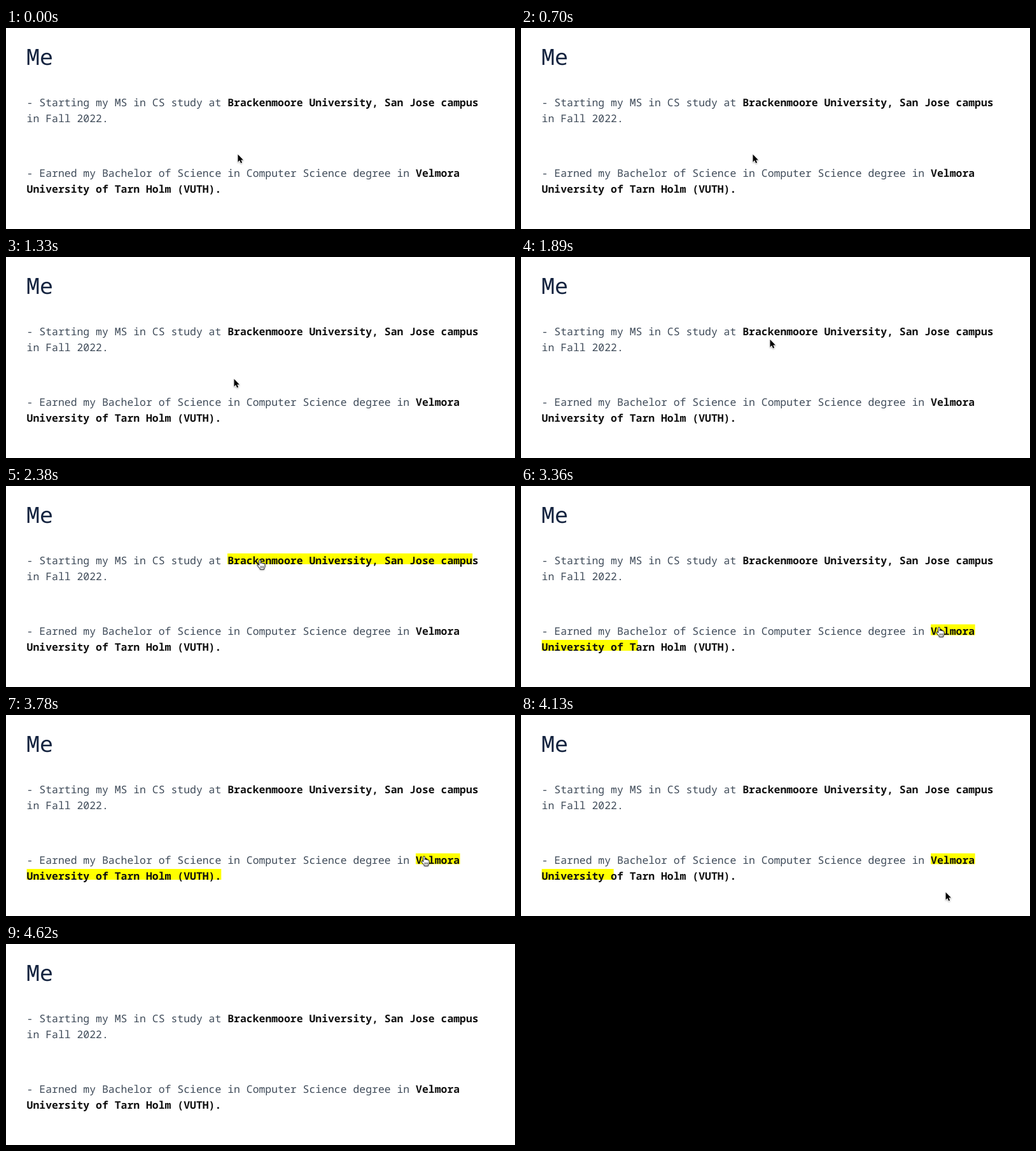
Recreate the animation shown at these times as an HTML page. Size 800 by 316 pixels, loop 4760 ms.

```html
<!DOCTYPE html>
<html lang="en">
<head>
<meta charset="utf-8">
<title>About me</title>
<style>
  html, body { margin: 0; width: 100%; height: 100%; overflow: hidden; background: #fff; }
  svg { display: block; width: 800px; height: 316px; }
  text {
    font: 300 16.45px "Noto Sans Mono", "DejaVu Sans Mono", monospace;
    fill: #3f4b59;
    white-space: pre;
    text-rendering: geometricPrecision;
  }
  .title { font-size: 35px; font-weight: 450; fill: #14233f; }
  .strong { font-weight: 600; fill: #111; }
  .mark rect { fill: #ff0; height: 17px; }
  #arrow, #hand { filter: drop-shadow(0 1px 1px rgba(0, 0, 0, .3)); }
</style>
</head>
<body>
<svg viewBox="0 0 800 316">
  <g class="mark">
    <rect id="school" x="348" y="106"/>
    <rect id="degreeTop" x="644" y="217.5"/>
    <rect id="degreeEnd" x="32.6" y="242"/>
  </g>

  <text class="title" x="32" y="57.5">Me</text>
  <text x="32.6" y="123">- Starting my MS in CS study at <tspan class="strong">Brackenmoore University, San Jose campus</tspan></text>
  <text x="32.6" y="147.6">in Fall 2022.</text>
  <text x="32.6" y="234.3">- Earned my Bachelor of Science in Computer Science degree in <tspan class="strong">Velmora</tspan></text>
  <text class="strong" x="32.6" y="258.9">University of Tarn Holm (VUTH).</text>

  <g id="arrow">
    <path transform="translate(.5 .7) scale(.88)" d="M0 0V13.6L3.1 10.7L5.2 15.6L7.5 14.6L5.4 9.9H9.6Z"
      fill="#000" stroke="#fff" stroke-width="1.6" stroke-linejoin="round" paint-order="stroke"/>
  </g>
  <g id="hand">
    <g transform="translate(-5.5 -.9)" stroke="#111" stroke-linecap="round" stroke-linejoin="round">
      <path fill="#fff" d="M4.2 9.5V2.2a1.3 1.3 0 0 1 2.6 0V6.6a1.2 1.2 0 0 1 2.4 .2a1.2 1.2 0 0 1 2.3 .5
        a1.1 1.1 0 0 1 2 .8V11c0 2-1.2 2.6-1.4 5H6c-.3-2-2.6-3.6-4.4-6.2c-.8-1.4 .8-2.2 1.8-1.2Z"/>
      <path fill="none" stroke-width=".8" d="M6.8 11v2.6M8.9 11v2.6M11 11v2.6"/>
    </g>
  </g>
</svg>
<script>
const LOOP = 4760, STEP = 70, LAST = 4620, FADE = 500, GONE = 4200;
const $ = id => document.getElementById(id);

// time, x, y of the pointer tip
const path = [
  [0, 364, 198], [910, 364, 198], [1330, 358, 191], [1540, 360, 187],
  [1890, 391, 129], [1980, 399, 116], [2660, 399, 116], [2760, 432, 128],
  [3010, 607, 190], [3190, 652, 219], [3290, 657, 222], [3900, 657, 222],
  [3980, 660, 240], [4150, 668, 283], [LOOP, 668, 283]
];
const hovers = [[1980, 2760], [3190, 3980]];
const widths = { school: 394.8, top: 69.6, end: 305.7 };

const clamp = (v, lo, hi) => Math.min(hi, Math.max(lo, v));

// cubic-bezier(.25, .1, .25, 1)
function ease(x) {
  if (x <= 0 || x >= 1) return clamp(x, 0, 1);
  const curve = (s, a, b) => 3 * (1 - s) ** 2 * s * a + 3 * (1 - s) * s * s * b + s ** 3;
  let lo = 0, hi = 1;
  for (let i = 0; i < 24; i++) {
    const mid = (lo + hi) / 2;
    if (curve(mid, .25, .25) < x) lo = mid; else hi = mid;
  }
  return curve(lo, .1, 1);
}

const fill = (t, [enter, leave]) => ease((t - enter) / FADE) - ease((t - leave) / FADE);

function pointer(t) {
  const i = path.findIndex(p => p[0] > t);
  const [t0, x0, y0] = path[i - 1], [t1, x1, y1] = path[i];
  const k = (t - t0) / (t1 - t0);
  return [x0 + (x1 - x0) * k, y0 + (y1 - y0) * k];
}

function draw(t) {
  $("school").style.width = widths.school * fill(t, hovers[0]) + "px";

  const run = (widths.top + widths.end) * fill(t, hovers[1]);
  $("degreeTop").style.width = Math.min(run, widths.top) + "px";
  $("degreeEnd").style.width = Math.max(0, run - widths.top) + "px";

  const over = hovers.some(([a, b]) => t >= a && t < b);
  const at = `translate(${pointer(t)})`;
  for (const id of ["arrow", "hand"]) {
    $(id).setAttribute("transform", at);
    $(id).style.display = t < GONE && over === (id === "hand") ? "" : "none";
  }
}

function tick() {
  const t = performance.now() % LOOP;
  draw(Math.min(LAST, Math.floor(t / STEP) * STEP));
  requestAnimationFrame(tick);
}
tick();
</script>
</body>
</html>
```
